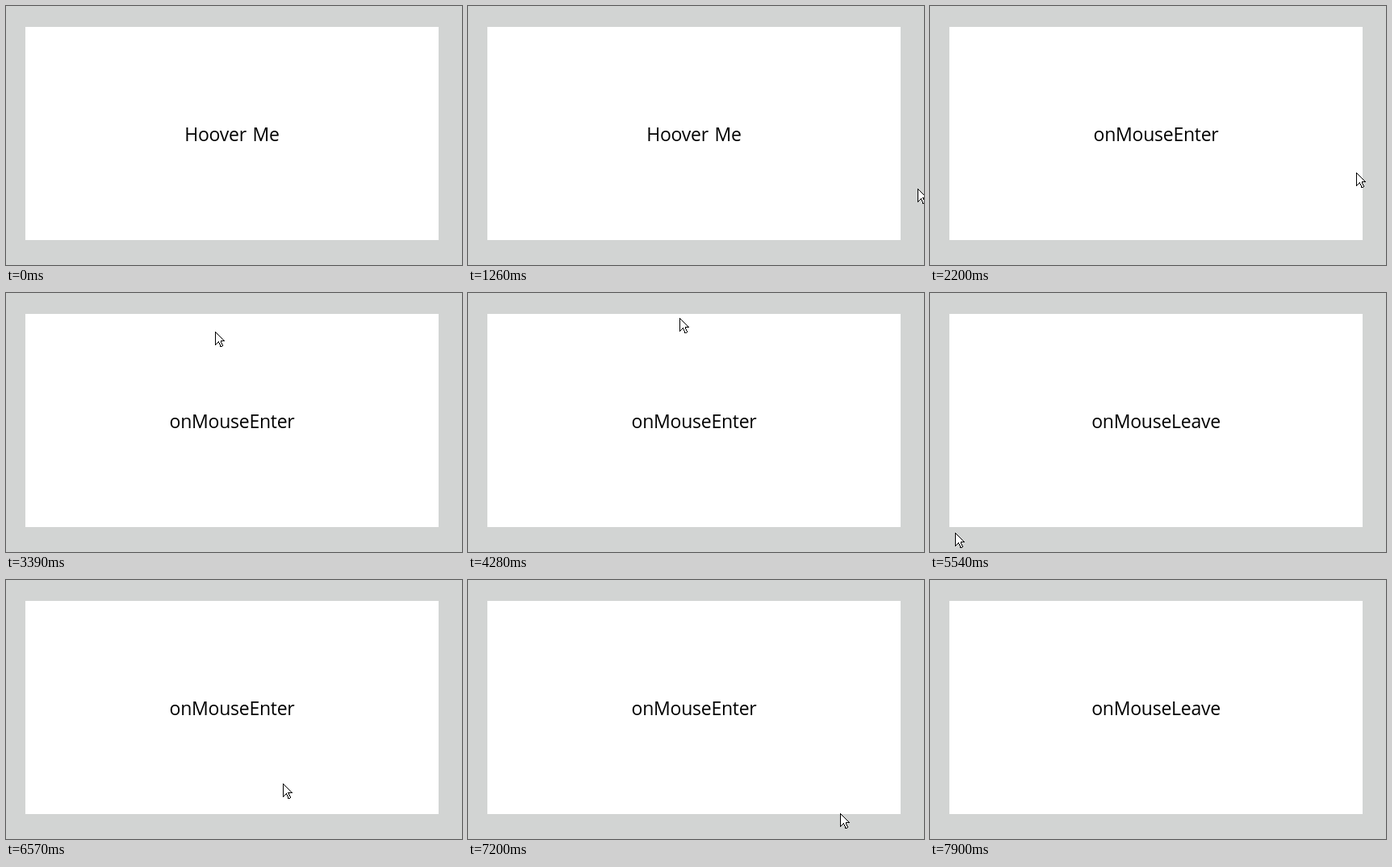
An HTML page for the animation above (8430 ms loop, 565 px wide and 322 px high).

```html
<!DOCTYPE html>
<html lang="en">
<head>
<meta charset="utf-8">
<title>Mouse enter and leave</title>
<style>
  html, body { margin: 0; width: 100%; height: 100%; overflow: hidden; background: #d2d4d3; }
  svg { display: block; width: 565px; height: 322px; }
  text {
    font: 23px "Open Sans", "Noto Sans", sans-serif;
    letter-spacing: -.25px;
    word-spacing: 2px;
    text-anchor: middle;
  }
</style>
</head>
<body>
<svg viewBox="0 0 565 322">
  <rect x="24" y="26" width="512" height="265" fill="#fff"/>
  <text id="label" x="280" y="168">Hoover Me</text>
  <path id="cursor" d="M.5 .5V16.5L4.5 12.5L7 18.5H8.5L9.5 17.5L7 11.5H11.5Z"
    fill="#fff" stroke="#000" stroke-linejoin="round" shape-rendering="crispEdges"/>
</svg>
<script>
const LOOP = 8430, STEP = 70;
const label = document.getElementById('label');
const cursor = document.getElementById('cursor');

// Each sweep of the pointer: start in ms, then key points [step, x, y]
const sweeps = [
  { start: 0, path: [[0, 580, 240]] },
  { start: 1120, path: [[0, 563, 230], [4, 551, 224]] },
  { start: 2060, path: [[0, 545, 222], [2, 528, 207], [5, 500, 198], [8, 376, 138],
    [12, 310, 103], [14, 264, 82], [19, 259, 48], [25, 261, 21]] },
  { start: 4210, path: [[0, 261, 24], [1, 262, 31], [4, 240, 91], [12, 50, 255], [19, 31, 298]] },
  { start: 5870, path: [[0, 32, 296], [4, 129, 231], [10, 343, 253], [25, 516, 314], [29, 522, 323]] }
];

// Smooth curve through the key points, resting at the last one
function along(path, step) {
  const last = path.length - 1;
  if (step >= path[last][0]) return path[last].slice(1);
  const i = path.findIndex(p => p[0] > step) - 1;
  const a = path[i], b = path[i + 1];
  const span = b[0] - a[0], u = (step - a[0]) / span;
  const slope = (k, axis) => {
    const p = path[Math.max(k - 1, 0)], n = path[Math.min(k + 1, last)];
    return (n[axis] - p[axis]) / (n[0] - p[0]);
  };
  return [1, 2].map(axis => {
    const ease = u * u * (3 - 2 * u);
    const bend = span * u * (1 - u) * ((1 - u) * slope(i, axis) - u * slope(i + 1, axis));
    return Math.round(a[axis] + (b[axis] - a[axis]) * ease + bend);
  });
}

function draw(ms) {
  const { start, path } = sweeps.filter(s => s.start <= ms).pop();
  const [x, y] = along(path, Math.floor((ms - start) / STEP));
  const inside = x >= 24 && x < 536 && y >= 26 && y < 291;
  const visited = ms >= sweeps[2].start + 2 * STEP;
  const text = inside ? 'onMouseEnter' : visited ? 'onMouseLeave' : 'Hoover Me';
  if (label.textContent !== text) label.textContent = text;
  cursor.setAttribute('transform', `translate(${x} ${y})`);
}

const begin = performance.now();
function tick() {
  draw((performance.now() - begin) % LOOP);
  requestAnimationFrame(tick);
}
tick();
</script>
</body>
</html>
```
